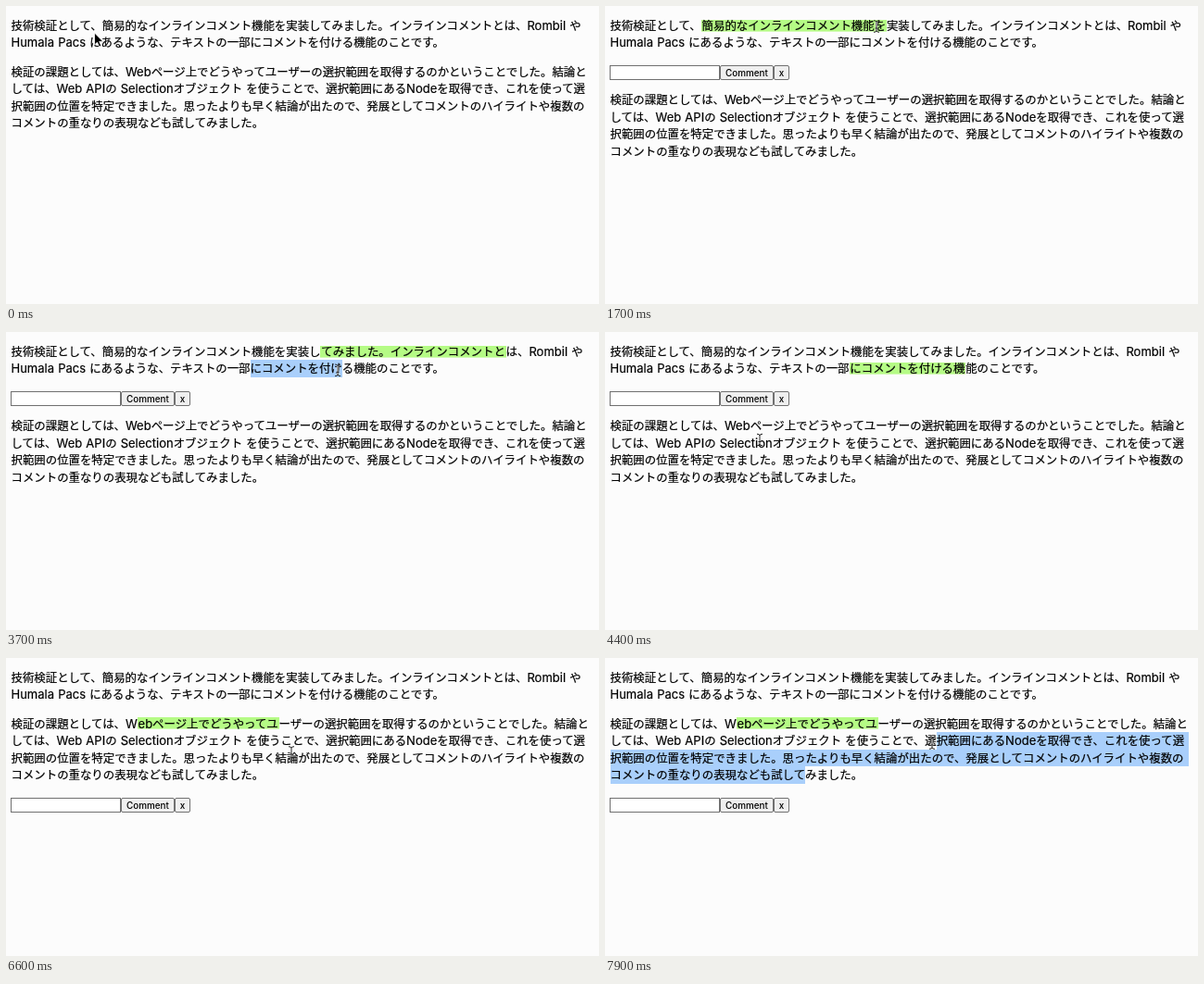
An HTML page for the animation above (8 s loop, 640 by 322 pixels).

```html
<!DOCTYPE html>
<html lang="ja">
<meta charset="utf-8">
<title>Inline comments</title>
<style>
html, body { margin: 0; width: 100%; height: 100%; overflow: hidden; background: #fcfcfc; }
#stage { position: relative; width: 640px; height: 322px; overflow: hidden; color: #000;
  font: 12.42px/17.14px "Noto Sans CJK JP", "Noto Sans CJK", sans-serif; text-spacing-trim: space-all; }
.line { position: absolute; left: 5.5px; width: 624.5px; height: 18.54px; overflow: hidden;
  white-space: pre; box-sizing: border-box; -webkit-text-stroke: .2px; }
.line span { display: inline-block; padding: 1px 0 .4px; vertical-align: baseline; }
.line i { font: 13px/0 Inter, sans-serif; word-spacing: .5px; }
.line .mark { padding-left: .8px; padding-right: .8px;
  background: linear-gradient(#b5fb85, #b5fb85) 0 50% / 100% 12.6px no-repeat; }
.line .sel { background: #a9cffb; }
.line .full { padding-right: 9px; }
#form { position: absolute; left: 5px; display: none; }
#form > * { box-sizing: border-box; height: 16px; margin: 0; padding: 0; border: 1px solid #707070;
  font: 500 9.9px/14px Inter, sans-serif; color: #000; text-align: center; }
#form input { width: 119px; background: #fff; border-radius: 0; }
#form button { width: 58px; background: #efefef; border-radius: 2px; }
#form button + button { width: 17px; }
svg { position: absolute; left: 0; top: 0; width: 640px; height: 322px; }
</style>
<div id="stage">
  <div id="text"></div>
  <div id="form"><input tabindex="-1"><button>Comment</button><button>x</button></div>
  <svg fill="none">
    <g id="pointer">
      <path id="arrow" d="M0 0V13L3 10.3 5.1 15 7.3 14 5.2 9.4H9.3Z" fill="#000" stroke="#fff" stroke-width=".8"/>
      <g id="beam">
        <path d="M0-5V5" stroke="#fff" stroke-width="2.4"/>
        <path d="M-3-6.3Q0-6.3 0-4.5V4.5Q0 6.3-3 6.3M3-6.3Q0-6.3 0-4.5M0 4.5Q0 6.3 3 6.3M-1.5 2h3" stroke="#222"/>
      </g>
    </g>
  </svg>
</div>
<script>
const LOOP = 8000, STEP = 100, LINE_H = 18.54, LEFT = 5.5;
const LINES = [
  '技術検証として、簡易的なインラインコメント機能を実装してみました。インラインコメントとは、Rombil や',
  'Humala Pacs にあるような、テキストの一部にコメントを付ける機能のことです。',
  '検証の課題としては、Webページ上でどうやってユーザーの選択範囲を取得するのかということでした。結論と',
  'しては、Web APIの Selectionオブジェクト を使うことで、選択範囲にあるNodeを取得でき、これを使って選',
  '択範囲の位置を特定できました。思ったよりも早く結論が出たので、発展としてコメントのハイライトや複数の',
  'コメントの重なりの表現なども試してみました。'
];

// Pointer path: time, x, y
const PATH = [
  [0, 95.5, 29], [250, 205, 112], [400, 297, 20], [500, 297, 20], [1150, 110, 22], [1400, 108, 20],
  [1700, 293, 22], [1850, 341, 21], [2300, 496, 19], [2550, 540, 17], [2700, 546, 15],
  [3250, 259, 39], [3900, 387, 42], [4100, 389, 43], [4400, 167, 116.5], [4750, 142, 104],
  [4900, 143, 103], [5400, 298, 107.8], [5900, 301, 104], [6200, 150, 72], [6600, 308, 102],
  [6850, 322, 96], [7300, 216, 127], [7750, 262, 110], [7900, 353, 92], [8000, 353, 92]
];

// Each drag starts at an anchor character and leaves a mark when released
const DRAGS = [
  { from: 500, to: 1200, line: 0, anchor: 24, mark: [8, 24] },
  { from: 1850, to: 2600, line: 0, anchor: 27, mark: [27, 43] },
  { from: 3300, to: 3950, line: 1, anchor: 26, mark: [26, 36] },
  { from: 4850, to: 5600, line: 2, anchor: 11, mark: [11, 24] },
  { from: 7300, to: 8100, line: 5, anchor: 17 }
];

const $ = id => document.getElementById(id);
const ctx = document.createElement('canvas').getContext('2d');
const rows = LINES.map(() => {
  const row = document.createElement('div');
  row.className = 'line';
  return $('text').appendChild(row);
});

function charWidth(ch) {
  if (ch > '~') return 12.42;
  ctx.font = '13px Inter, sans-serif';
  return ctx.measureText(ch).width;
}

function pointerAt(t) {
  const i = PATH.findIndex(p => p[0] > t);
  const [t0, x0, y0] = PATH[i - 1], [t1, x1, y1] = PATH[i];
  const u = (t - t0) / (t1 - t0), e = u * u * (3 - 2 * u);
  return [x0 + (x1 - x0) * e, y0 + (y1 - y0) * e];
}

function caretIndex(text, x) {
  let edge = LEFT, i = 0;
  for (; i < text.length; i++) {
    const w = charWidth(text[i]);
    if (x < edge + w / 2) break;
    edge += w;
  }
  return i;
}

// Groups the characters of a line by style
function lineHtml(n, mark, sel) {
  const styleOf = i => {
    const pos = n * 100 + i;
    if (sel && pos >= sel[0] && pos < sel[1]) return sel[1] >= (n + 1) * 100 ? 'sel full' : 'sel';
    return mark && pos >= mark[0] && pos < mark[1] ? 'mark' : '';
  };
  const text = LINES[n];
  let html = '';
  for (let i = 0, j; i < text.length; i = j) {
    const style = styleOf(i);
    for (j = i + 1; j < text.length && styleOf(j) === style;) j++;
    const run = text.slice(i, j).replace(/[ -~]+/g, '<i>$&</i>');
    html += `<span class="${style}">${run}</span>`;
  }
  return html;
}

function render(t) {
  const [x, y] = pointerAt(t);
  const drag = DRAGS.find(d => t >= d.from && t < d.to);
  const done = DRAGS.filter(d => t >= d.to).pop();
  const mark = done && done.mark.map(i => done.line * 100 + i);
  const formAbove = done && done.line < 2;
  const tops = LINES.map((_, n) => n < 2 ? 11.7 + n * LINE_H : (formAbove ? 92.4 : 61.5) + (n - 2) * LINE_H);
  const over = tops.findIndex(top => y >= top && y < top + LINE_H);

  let sel;
  if (drag) {
    const line = over < 0 ? drag.line : over;
    sel = [drag.line * 100 + drag.anchor, line * 100 + caretIndex(LINES[line], x)].sort((a, b) => a - b);
  }
  rows.forEach((row, n) => {
    row.style.top = tops[n] + 'px';
    row.innerHTML = lineHtml(n, mark, sel);
  });

  $('form').style.display = done ? 'flex' : 'none';
  $('form').style.top = (formAbove ? 63.5 : 150.6) + 'px';

  const inText = over >= 0 && y - tops[over] > 2.8 && y - tops[over] < 15.3;
  $('pointer').setAttribute('transform', `translate(${x} ${y})`);
  $('beam').style.display = inText ? '' : 'none';
  $('arrow').style.display = inText ? 'none' : '';
}

let shown = -1;
function tick() {
  const t = Math.floor(performance.now() % LOOP / STEP) * STEP;
  if (t !== shown) render(shown = t);
  requestAnimationFrame(tick);
}
tick();
</script>
</html>
```
